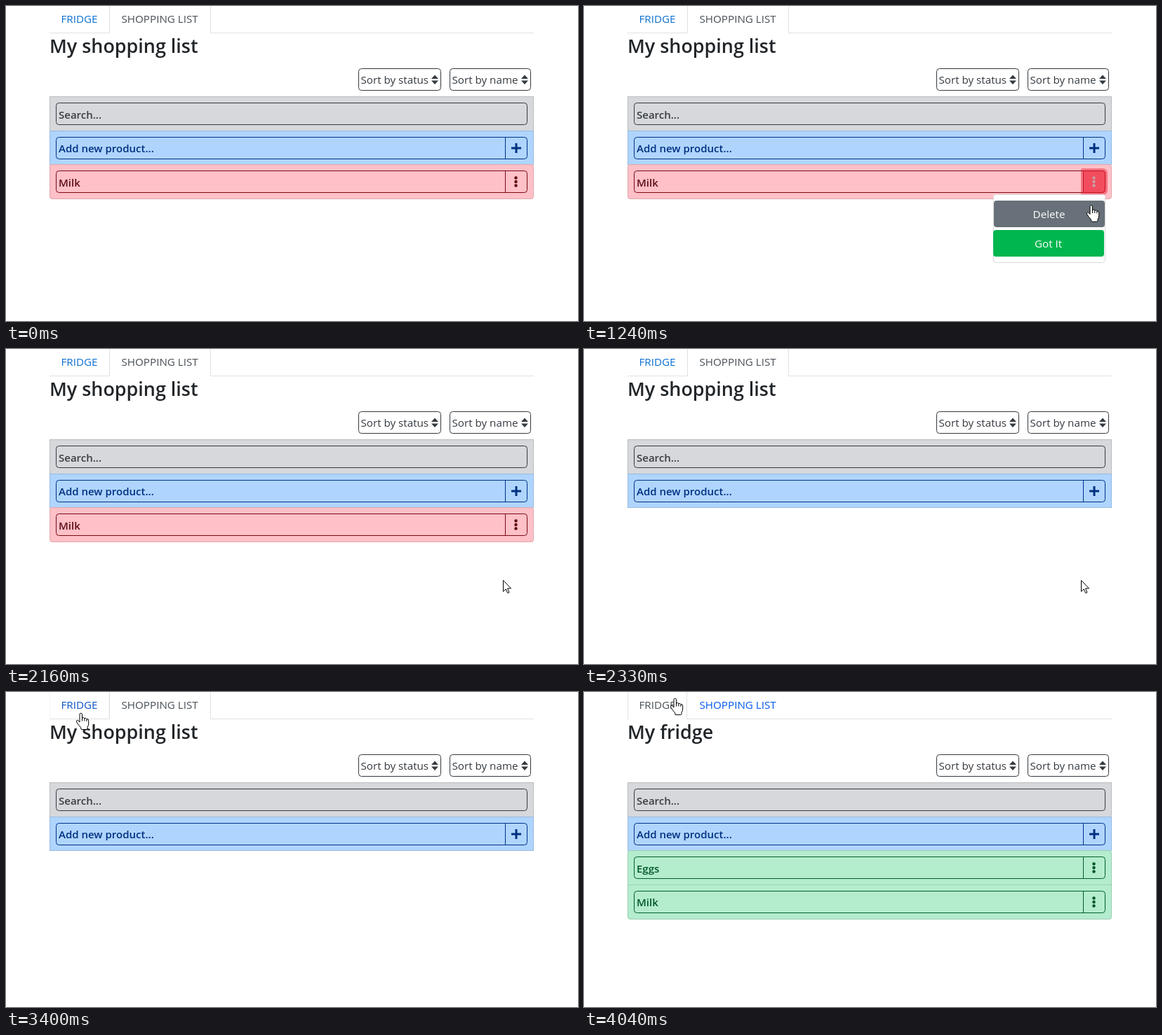
Write an HTML page with a canvas that moves like this. It is 815x450 px and loops after 5.04 s.

```html
<!DOCTYPE html>
<html lang="en">
<head>
<meta charset="utf-8">
<title>Shopping list</title>
<style>
html, body { margin: 0; width: 100%; height: 100%; overflow: hidden; background: #fff; }
canvas { display: block; width: 815px; height: 450px; }
</style>
</head>
<body>
<canvas id="stage" width="815" height="450"></canvas>
<script>
const ctx = document.getElementById('stage').getContext('2d');
const LOOP = 5040;
const FAMILY = '"Open Sans", "Noto Sans", sans-serif';
const REGULAR = `400 15.2px ${FAMILY}`;
const STRONG = `600 15px ${FAMILY}`;
const TITLE = `600 26.9px ${FAMILY}`;
const TAB_LINE = '#dee2e6';
const DARK = '#343a40';

const GREY = { bg: '#d6d8db', line: '#343a40', ink: '#383d41' };
const BLUE = { bg: '#afd5ff', line: '#003087', ink: '#00307f' };
const RED = { bg: '#ffc0c7', line: '#790a15', ink: '#5e0c15' };
const GREEN = { bg: '#b4ecce', line: '#005f29', ink: '#00562a' };

// Pointer stops: time, x, y, kind
const STOPS = [
  [170, 745, 426, 'arrow'], [240, 744, 405, 'arrow'], [310, 741, 370, 'arrow'],
  [390, 738, 330, 'arrow'], [460, 735, 298, 'arrow'], [540, 731, 267, 'hand'],
  [620, 729, 264.5, 'hand'], [680, 727, 259, 'hand'],
  [1150, 725, 267, 'hand'], [1240, 723, 284.5, 'hand'], [1320, 716, 308, 'hand'],
  [1390, 711, 324, 'hand'], [1470, 709, 329, 'hand'], [1550, 708, 330, 'hand'],
  [2100, 708, 330, 'arrow'], [2870, 699, 330, 'arrow'], [2930, 645, 305, 'arrow'],
  [3010, 520, 250, 'arrow'], [3090, 370, 184, 'arrow'], [3170, 235, 124, 'arrow'],
  [3250, 140, 83, 'arrow'], [3330, 101, 67, 'beam'],
  [3400, 107, 30, 'hand'], [3480, 113, 16, 'hand'], [3560, 119, 6, 'hand'],
  [3630, 122, 1, 'hand'], [3710, 124, -2, 'hand'], [3880, 130, 9, 'hand']
];

const clamp = v => Math.max(0, Math.min(1, v));
const ramp = (t, from, to) => clamp((t - from) / (to - from));
const rgb = hex => [1, 3, 5].map(i => parseInt(hex.slice(i, i + 2), 16));
function mix(a, b, k) {
  const to = rgb(b);
  return `rgb(${rgb(a).map((v, i) => Math.round(v + (to[i] - v) * k))})`;
}

function text(str, x, y, color, font = REGULAR, align = 'left') {
  ctx.font = font;
  ctx.fillStyle = color;
  ctx.textAlign = align;
  ctx.fillText(str, x, y);
}

// Box with a one-pixel border drawn inside its edges
function box(x, y, w, h, r, fill, line) {
  ctx.beginPath();
  ctx.roundRect(x, y, w, h, r);
  if (fill) { ctx.fillStyle = fill; ctx.fill(); }
  if (!line) return;
  ctx.beginPath();
  ctx.roundRect(x + 0.5, y + 0.5, w - 1, h - 1, r);
  ctx.strokeStyle = line;
  ctx.lineWidth = 1;
  ctx.stroke();
}

function bar(x, y, w, h, color) {
  ctx.fillStyle = color;
  ctx.fillRect(x, y, w, h);
}

function shape(points, color) {
  ctx.beginPath();
  points.forEach(([x, y]) => ctx.lineTo(x, y));
  ctx.closePath();
  ctx.fillStyle = color;
  ctx.fill();
}

function dots(y, color) {
  ctx.fillStyle = color;
  for (const dy of [-5.5, 0, 5.5]) {
    ctx.beginPath();
    ctx.arc(726.5, y + dy, 2.25, 0, 7);
    ctx.fill();
  }
}

function row(y, h, r, theme, label, baseline) {
  box(62, y, 690, h, r, theme.bg, 'rgba(0,0,0,.125)');
  box(71, y + 9, 672, 32, 4, null, theme.line);
  text(label, 75, baseline, theme.ink, STRONG);
}

function product(y, r, theme, label) {
  row(y, 50, r, theme, label, y + (y === 275 ? 31 : 32));
  bar(711, y + 9, 1, 32, theme.line);
  dots(y + 25, theme.ink);
}

function sortButton(x, w, label) {
  box(x, 89, w, 32, 4, '#fff', DARK);
  text(label, x + 3.5, 111, DARK);
  const c = x + w - 9;
  shape([[c - 5, 104], [c, 98.5], [c + 5, 104]], DARK);
  shape([[c - 5, 106.5], [c + 5, 106.5], [c, 112]], DARK);
}

function tabs(t, fridge) {
  const hover = ramp(t, 3330, 3560);
  const [left, right] = fridge ? [62, 147] : [147, 292];
  bar(62, 38, 690, 1, TAB_LINE);
  bar(left, 38, right - left, 1, '#fff');
  bar(left, 0, 1, 39, TAB_LINE);
  bar(right - 1, 0, 1, 39, TAB_LINE);
  if (!fridge && hover) {
    ctx.globalAlpha = hover;
    bar(62, 0, 1, 38, TAB_LINE);
    bar(146, 0, 1, 38, TAB_LINE);
    ctx.globalAlpha = 1;
  }
  text('FRIDGE', 78.5, 24, fridge ? '#495057' : mix('#0a70d0', '#1010b8', hover));
  text('SHOPPING LIST', 164.5, 24, fridge ? '#0058f0' : '#495057');
}

// Menu button of the red row: hover fill and focus ring
function menuButton(heat, ring) {
  if (ring) {
    ctx.beginPath();
    ctx.roundRect(709.5, 233.5, 35, 35, [1, 5, 5, 1]);
    ctx.strokeStyle = `rgba(234,20,41,${0.45 * ring})`;
    ctx.lineWidth = 3;
    ctx.stroke();
  }
  if (!heat) return;
  box(711, 235, 32, 32, [0, 4, 4, 0], mix(RED.bg, '#ea1429', heat), mix(RED.line, '#e41228', heat));
  dots(251, mix(RED.ink, '#ffe4e8', heat));
}

function menu(t) {
  const first = t >= 1240 && t < 1320 ? 0.2 : t >= 1320 && t < 1390 ? 1 : 0;
  const second = ramp(t, 1320, 1470);
  const option = (y, hover, color, dark, label) => {
    const x = hover ? 584 : 583;
    box(x, y, 158, 38, 4, mix(color, dark, hover));
    text(label, x + 78.5, y + 25, '#fff', REGULAR, 'center');
  };
  box(583, 269, 160, 98, 4, '#fff', '#d9d9d9');
  option(278, first, '#6c757d', '#5a6268', 'Delete');
  option(320, second, '#00b64f', '#00903f', 'Got It');
}

const ARROW = new Path2D('M.5 .5V16.5L4.2 13L6.8 18.7L9 17.7L6.5 12H11.5Z');
const HAND = new Path2D('M-2 1.8Q-2 .3 -.3 .3Q1.5 .3 1.5 1.8V7Q4 5.8 4.8 7.5Q7 6.6 7.9 8.6' +
  'Q10.7 8 10.7 10.8V15Q10.7 18 9 20.2V22Q9 23.6 7.5 23.6H1Q-.3 23.6 -.3 22V20.8' +
  'Q-4 17 -6.3 13Q-7.3 10.3 -5.2 10.3Q-3.8 10.3 -2 13Z');
const KNUCKLES = new Path2D('M1.5 7V11.5M4.8 7.5V11.5M7.9 8.6V12');
const BEAM = new Path2D('M-3 -7.5H-1Q0 -7.5 0 -6.5Q0 -7.5 1 -7.5H3M0 -6.5V6.5M-3 7.5H-1Q0 7.5 0 6.5Q0 7.5 1 7.5H3');

function pointer([, x, y, kind]) {
  ctx.save();
  ctx.translate(x, y);
  ctx.strokeStyle = '#000';
  ctx.fillStyle = '#fff';
  ctx.lineWidth = 1;
  if (kind === 'beam') {
    ctx.stroke(BEAM);
  } else {
    const path = kind === 'hand' ? HAND : ARROW;
    ctx.fill(path);
    ctx.stroke(path);
    if (kind === 'hand') ctx.stroke(KNUCKLES);
  }
  ctx.restore();
}

function draw(time) {
  const stop = STOPS.findLast(s => s[0] <= time);
  // Fades follow the pointer's stops, except for the pauses in between
  const t = stop && time - stop[0] < 100 ? stop[0] : time;
  const fridge = time >= 4040;

  bar(0, 0, 815, 450, '#fff');
  tabs(t, fridge);
  text(fridge ? 'My fridge' : 'My shopping list', 62, 67, '#212529', TITLE);
  sortButton(502, 118, 'Sort by status');
  sortButton(632, 116, 'Sort by name');

  row(129, 50, 0, GREY, 'Search...', 161);
  row(178, 49, 0, BLUE, 'Add new product...', 209);
  bar(711, 187, 1, 32, BLUE.line);
  bar(720, 201.5, 14, 3, BLUE.ink);
  bar(725.5, 196, 3, 14, BLUE.ink);

  if (fridge) {
    product(226, [4, 4, 0, 0], GREEN, 'Eggs');
    product(275, [0, 0, 4, 4], GREEN, 'Milk');
  } else if (time < 2330) {
    product(226, 4, RED, 'Milk');
    const heat = ramp(t, 500, 610) * (1 - ramp(t, 1150, 1420));
    const ring = time < 770 || time >= 2160 ? 0 : time < 850 || time >= 2100 ? 0.5 : 1;
    menuButton(heat, ring);
    if (time >= 770 && time < 2100) menu(t);
  }
  if (stop) pointer(stop);
}

const start = performance.now();
function tick() {
  draw((performance.now() - start) % LOOP);
  requestAnimationFrame(tick);
}
tick();
</script>
</body>
</html>
```
